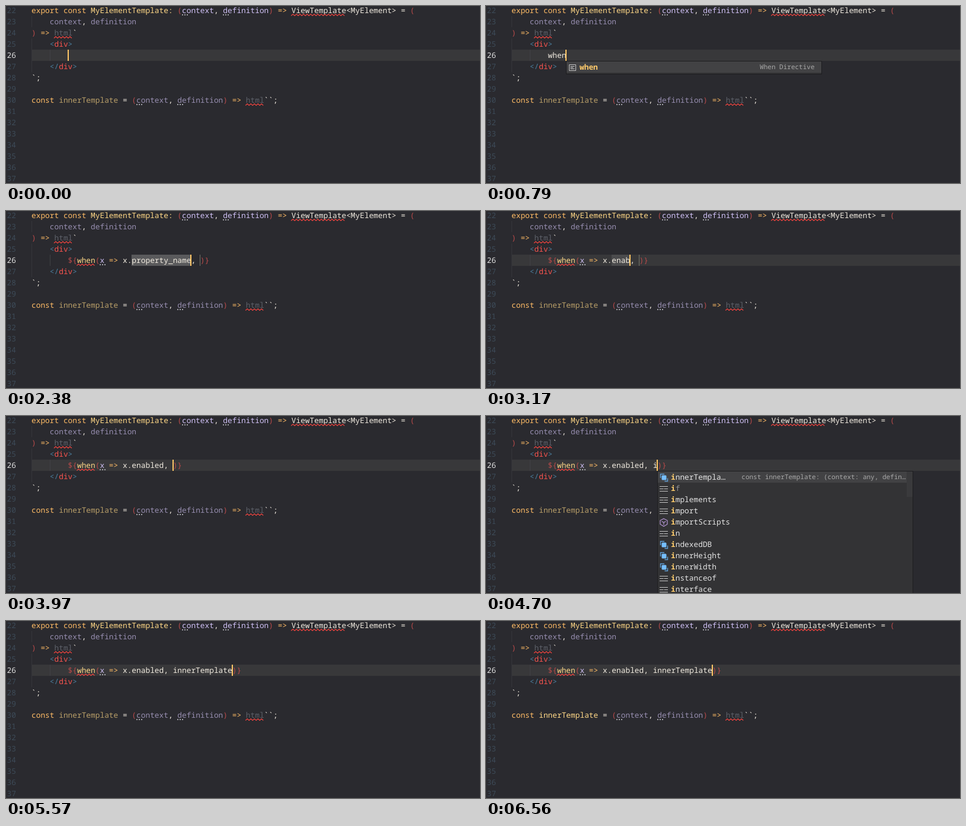
An HTML page for the animation above (6.69 s loop, 800 by 300 pixels).

```html
<!DOCTYPE html>
<html lang="en">
<head>
<meta charset="utf-8">
<title>Template completion</title>
<style>
  html, body { margin: 0; width: 100%; height: 100%; overflow: hidden; background: #2a2a2f; }
  svg { display: block; }
  text { font: 500 12.83px "Noto Sans Mono", monospace; white-space: pre; text-rendering: geometricPrecision; }
  .detail { font-size: 11px; fill: #a9a9a9; text-anchor: end; }
  .number { font-weight: 400; }
  .match { font-weight: bold; fill: #ffcb6b; }
</style>
</head>
<body>
<svg id="stage" width="800" height="300" viewBox="0 0 800 300"></svg>
<script>
const LOOP = 6690, LEFT = 42.5, CHAR = 7.697, LINE = 19;
const colors = {
  o: '#ffbc66', y: '#ffd887', w: '#f1ebe0', r: '#b84a4a', v: '#cfc0f5',
  p: '#978eb0', g: '#5d6069', b: '#4b7f9f', t: '#f9544f', d: '#b89e68'
};

// Each segment starts with its colour key; segments are split by ~
const before = {
  22: 'oexport const ~yMyElementTemplate: ~r(~vcontext~w, ~vdefinition~r)~o => ~wViewTemplate<MyElement> = ~r(',
  23: 'p    context~w, ~pdefinition',
  24: 'r)~o => ~ghtml~w`',
  25: 'b    <~tdiv~b>',
  27: 'b    </~tdiv~b>',
  28: 'w`;'
};

const shortList = ['v:innerTempla…', 'k:if', 'k:implements', 'k:import', 'm:importScripts', 'k:in',
  'v:indexedDB', 'v:innerHeight', 'v:innerWidth', 'k:instanceof', 'k:interface'];
const longList = ['v:innerTempla…', 'v:innerHeight', 'v:innerWidth', 'k:instanceof', 'v:InputEvent',
  'v:IntersectionObserverEntry', 'v:IntersectionObserver', 'v:IDBVersionChangeEvent',
  'v:PictureInPictureWindow', 'v:ImageBitmapRenderingContext'];
const whenList = ['s:when', 'k:wbr'];

// Changes of state, applied one after another
const steps = [
  [0, { typed: '', cursor: true }],
  [200, { cursor: false }],
  [460, { typed: 'w', cursor: true, list: whenList }],
  [590, { typed: 'wh' }],
  [660, { typed: 'whe' }],
  [790, { typed: 'when' }],
  [1250, { arg: 'property_name', list: null }],
  [1780, { linted: true }],
  [1850, { cursor: false }],
  [2380, { cursor: true }],
  ...[2710, 2840, 2970, 3170, 3240, 3370, 3570].map((t, i) => [t, { arg: 'enabled'.slice(0, i + 1) }]),
  [3970, { tail: '' }],
  [4500, { cursor: false }],
  [4630, { tail: 'i', cursor: true }],
  [4700, { list: shortList }],
  [4770, { tail: 'in' }],
  [4900, { tail: 'inn', list: longList }],
  [5030, { tail: 'inne' }],
  [5100, { tail: 'inner' }],
  [5500, { tail: 'innerTemplate', list: null }],
  [5960, { used: true }],
  [6030, { cursor: false }],
  [6560, { cursor: true }]
];

const colX = col => LEFT + col * CHAR;
const rowY = row => (row - 22) * LINE - 2;
const escape = s => s.replace(/&/g, '&amp;').replace(/</g, '&lt;');
const rect = (x, y, w, h, fill, more = '') =>
  `<rect x="${x}" y="${y}" width="${w}" height="${h}" fill="${fill}" ${more}/>`;
const stroke = (d, color, width = 1) =>
  `<path d="${d}" fill="none" stroke="${color}" stroke-width="${width}"/>`;
const text = (x, y, body, attrs = '') => `<text x="${x}" y="${y}" ${attrs}>${body}</text>`;

function code(row, source) {
  const spans = source.split('~').map(s => `<tspan fill="${colors[s[0]]}">${escape(s.slice(1))}</tspan>`);
  return text(LEFT + .5, rowY(row) + 14, spans.join(''));
}

function squiggle(row, col, length) {
  const x = colX(col), width = length * CHAR;
  let d = `M${x} ${rowY(row) + 18.5}`;
  for (let i = 3; i <= width; i += 3) d += `l3 ${i % 2 ? -2.6 : 2.6}`;
  return stroke(d, '#f0443f', 1.2);
}

const hint = (row, col) => [0, 4, 8].map(dx =>
  rect(Math.round(colX(col)) + dx, rowY(row) + 16, 2, 2, '#a2a2a8')).join('');

// Positions of the query letters in a label, capitals first; null if they do not fit
function locate(label, query) {
  const found = [];
  let from = 0;
  for (const c of query) {
    let at = found.length || label[0] !== c ? label.indexOf(c.toUpperCase(), from) : 0;
    if (at < 0) at = label.indexOf(c, from);
    if (at < 0) return null;
    found.push(at);
    from = at + 1;
  }
  return found;
}
const fuzzy = (label, q) => locate(label, q) || (q.length > 3 && locate(label, q.slice(0, 2) + q[3] + q[2] + q.slice(4)));

const icons = {
  v: () => rect(3.5, 3.5, 8, 8, '#75beff', 'rx="1.5"') +
    stroke('M1.5 8V1.5H8M13.5 8.5V13.5H8.5', '#5f9fd8', 1.4),
  k: () => stroke('M0 3.5H14M0 7.5H6.5M7.5 7.5H14M0 11.5H14', '#c5c5c5', 1.2),
  m: () => stroke('M7 1L13 4V10.5L7 14L1 10.5V4ZM3.5 5.5L7 7.5L10.5 5.5M7 7.5V11.5', '#b595d6', 1.2),
  s: () => stroke('M1.5 2.5H12.5V12.5H1.5ZM3.5 5.5H10.5M3.5 7.5H8M3.5 9.5H10.5', '#c5c5c5')
};

function popup(left, list, query) {
  const items = list.map(s => ({ kind: s[0], label: s.slice(2), hits: fuzzy(s.slice(2), query) }))
    .filter(item => item.hits && (list !== whenList || item.label.startsWith(query)));
  const scrolls = items.length > 10;
  const height = (scrolls ? 12 : items.length) * LINE + 3;
  let out = rect(left + .5, 93.5, 431, height, '#333335', 'stroke="#1d1d20"') +
    rect(left + 1, 94, 430, LINE, '#424244');
  if (scrolls) out += rect(left + 421, 94, 10, 43, '#3a3a3c');
  items.forEach(({ kind, label, hits }, i) => {
    const y = 94 + i * LINE;
    const letters = [...label].map((c, j) => hits.includes(j) ? `<tspan class="match">${c}</tspan>` : c);
    out += `<g transform="translate(${left + 4} ${y + 3})">${icons[kind]()}</g>` +
      text(left + 23, y + 14, letters.join(''), `fill="${i === 1 ? '#929292' : '#e4e4e4'}"`);
  });
  const detail = list === whenList ? 'When Directive' : 'const innerTemplate: (context: any, defin…';
  return out + text(left + 419.5, 107, detail, 'class="detail"');
}

function draw(s) {
  const filled = s.arg !== undefined, inTail = s.tail !== undefined;
  const selected = s.arg === 'property_name';
  const col = !filled ? 8 + s.typed.length : 22 + s.arg.length + (inTail ? 2 + s.tail.length : 0);
  const top = rowY(26);
  let out = selected ? '' : rect(43, top, 757, LINE, '#38383a');

  for (const row of [23, 25, 26, 27]) out += rect(43, rowY(row), 1, LINE, '#35363b');
  out += rect(74, top, 1, LINE, '#404145');
  for (let row = 22; row < 38; row++)
    out += text(1.5, rowY(row) + 14, row, `class="number" fill="${row === 26 ? '#e0e0e0' : '#3d4b58'}"`);

  if (filled && !inTail) {
    out += rect(colX(22), top, s.arg.length * CHAR, LINE, selected ? '#5a5a5c' : '#4b4b4d');
    out += rect(Math.floor(colX(24 + s.arg.length)), top, 1, LINE, '#77766a');
  }
  for (const row in before) out += code(row, before[row]);
  out += code(26, filled
    ? `r        \${~ywhen~r(~vx~o => ~wx.${s.arg}, ${s.tail || ''}~r)}`
    : `w        ${s.typed}`);
  out += code(30, `oconst ~${s.used ? 'y' : 'd'}innerTemplate~w = ~r(~pcontext~w, ~pdefinition~r)~o => ~ghtml~w\`\`;`);

  out += squiggle(22, 57, 12) + squiggle(24, 5, 4) + squiggle(30, 47, 4);
  out += hint(22, 33) + hint(22, 42) + hint(30, 23) + hint(30, 32);
  if (s.linted) out += squiggle(26, 10, 4) + hint(26, 15);
  if (s.cursor) out += rect(Math.floor(colX(col)), top, 2, LINE, '#ffc766');
  if (s.list) out += popup(Math.round(colX(col)), s.list, inTail ? s.tail : s.typed);
  stage.innerHTML = out;
}

const stage = document.getElementById('stage');
let shown = -1;
function tick() {
  const time = performance.now() % LOOP;
  const count = steps.filter(([start]) => start <= time).length;
  if (count !== shown) {
    shown = count;
    draw(Object.assign({}, ...steps.slice(0, count).map(step => step[1])));
  }
  requestAnimationFrame(tick);
}
tick();
</script>
</body>
</html>
```
